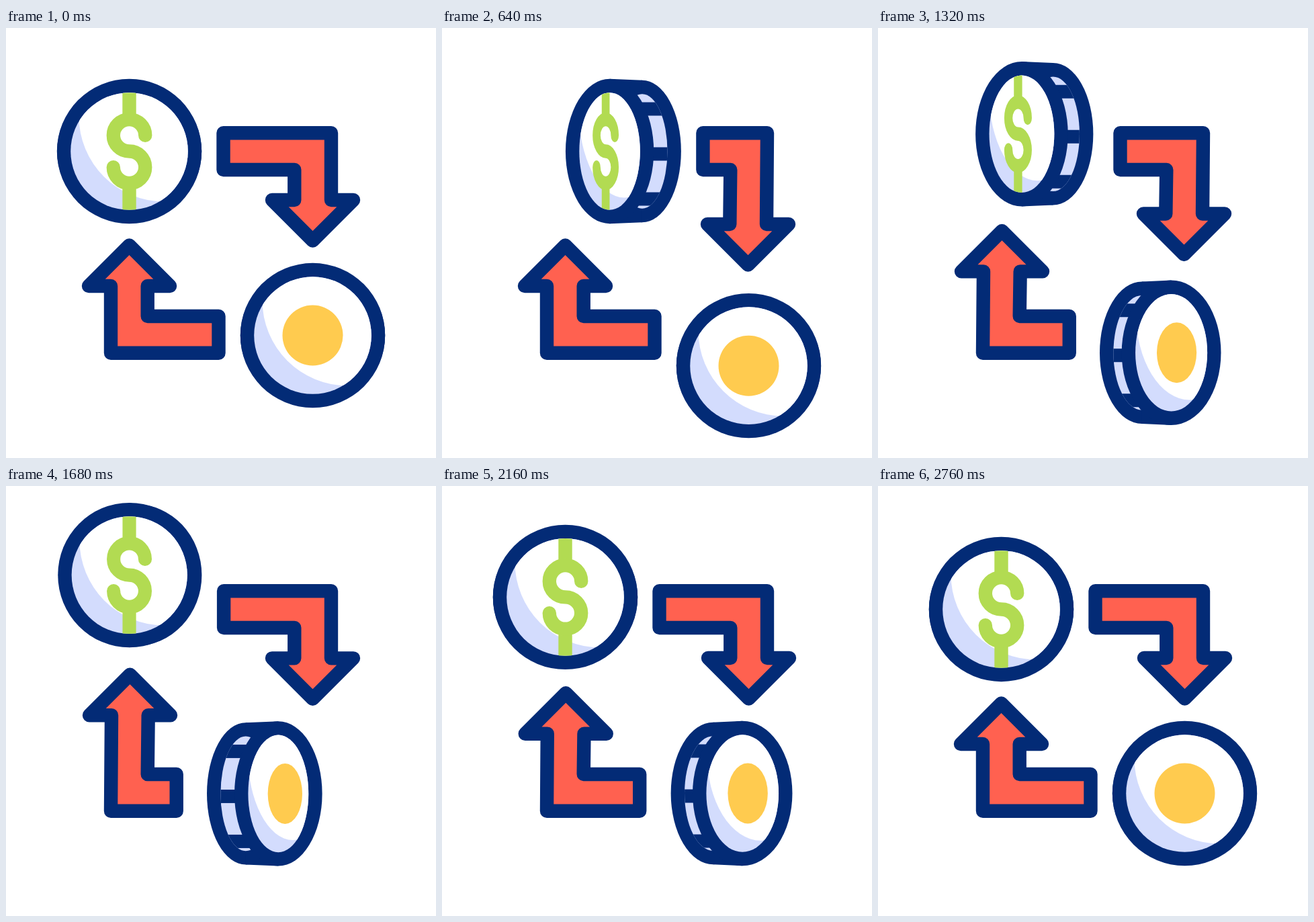
Recreate the animation shown at these times as an HTML page with a canvas. Size 640 by 640 pixels, loop 3 s.

```html
<!DOCTYPE html>
<html lang="en">
<head>
<meta charset="utf-8">
<title>Currency exchange</title>
<style>
  html, body { margin: 0; width: 100%; height: 100%; overflow: hidden; background: #fff; }
  canvas { display: block; width: 640px; height: 640px; }
</style>
</head>
<body>
<canvas></canvas>
<script>
const LOOP = 3000;
const NAVY = '#032b76', PALE = '#d3dcfd', RED = '#ff6150', GREEN = '#b2db52', GOLD = '#ffcb4f';
const LINE = 20.4, INNER = 87.3, OUTER = INNER + LINE;
const TAU = Math.PI * 2;

const canvas = document.querySelector('canvas');
const c = canvas.getContext('2d');
const ratio = window.devicePixelRatio || 1;
canvas.width = canvas.height = 640 * ratio;

// Soft step from 0 to 1, halfway at mid
const step = (t, mid, width = 75) => 1 / (1 + Math.exp((mid - t) / width));

// Amount of turn: it leads the travel on the way out and lags on the way back
const turn = (p, back) => 1 - Math.pow(1 - p, back ? 3.6 : 2.3);

function oval(x, rx, ry, color) {
  c.beginPath();
  c.ellipse(x, 0, rx, ry, 0, 0, TAU);
  if (color) {
    c.fillStyle = color;
    c.fill();
  }
}

// Edge of the coin; x runs from the face towards the rear
function rim(half, m) {
  const depth = 41 * m, rx = half + LINE;
  const lag = 25 * (1 - .7 * m) * Math.min(1, 10 * m);
  const rear = depth + lag, rearX = rx - lag, rearY = OUTER - 2;

  oval(rear, rearX, rearY, NAVY);
  c.beginPath();
  c.moveTo(0, -OUTER);
  c.lineTo(rear, -rearY);
  c.lineTo(rear, rearY);
  c.lineTo(0, OUTER);
  c.fill();

  c.save();
  oval(rear, rearX - LINE, rearY - LINE, PALE);
  c.clip();
  c.fillStyle = NAVY;
  for (let i = -1; i <= 1; i++) c.fillRect(0, 67 * i - 6, 2 * OUTER, 20);
  c.restore();
  oval(0, rx, OUTER, NAVY);
}

function dollar() {
  c.fillStyle = c.strokeStyle = GREEN;
  c.fillRect(-10.2, -92, 20.4, 48);
  c.fillRect(-10.2, 47, 20.4, 45);
  c.lineWidth = LINE;
  c.lineCap = 'round';
  c.beginPath();
  c.arc(0, -23.7, 23.7, 0, Math.PI / 2, true);
  c.arc(0, 23.7, 23.7, -Math.PI / 2, Math.PI);
  c.stroke();
}

function token() {
  oval(0, 45, 45, GOLD);
}

// shift: how far the emblem slides on a fully turned face
function coin(x, y, m, side, shift, emblem) {
  const half = INNER - 42.4 * m;
  c.save();
  c.translate(x - side * 20.5 * m, y);

  c.save();
  c.scale(side, 1);
  rim(half, m);
  c.restore();

  oval(0, half, INNER, PALE);
  c.clip();
  c.save();
  c.scale(half / INNER, 1);
  c.beginPath();
  c.arc(52 - 10 * m, -52 - 10 * m, 127 + 4 * m, 0, TAU);
  c.fillStyle = '#fff';
  c.fill();
  c.restore();

  c.translate(shift * m, 0);
  c.scale(1 - .43 * m, 1);
  emblem();
  c.restore();
}

function arrow(cut, drop, flip) {
  const left = 323.5 + cut, y = 256 + drop, x = 456.5 - Math.min(1, drop / 20);
  const points = [[left, 156.3], [484, 156.3], [x + 27.5, y], [x + 60.5, y], [x, y + 60.5],
    [x - 60.5, y], [x - 27.2, y], [429.3, 211], [left, 211]];
  c.save();
  if (flip) {
    c.translate(640, 640);
    c.scale(-1, -1);
  }
  c.beginPath();
  for (const p of points) c.lineTo(...p);
  c.closePath();
  c.fillStyle = RED;
  c.fill();
  c.strokeStyle = NAVY;
  c.lineWidth = LINE;
  c.lineJoin = 'round';
  c.stroke();
  c.restore();
}

function draw(t) {
  const start = step(t, 523, 60), middle = step(t, 1321), end = step(t, 2115);
  const a = start - middle, b = middle - end;
  c.setTransform(ratio, 0, 0, ratio, 0, 0);
  c.fillStyle = '#fff';
  c.fillRect(0, 0, 640, 640);
  arrow(74 * a, 41 * a, false);
  arrow(63.5 * b, 43.3 * b, true);
  coin(183.5 + 98.5 * a, 183.5 - 51.5 * b, turn(a, t > 1000), 1, -6, dollar);
  coin(456.5 - 72.5 * b, 457.5 + 51.5 * a, turn(b, t > 1720), -1, 10, token);
}

const begin = performance.now();
function tick() {
  draw((performance.now() - begin) % LOOP);
  requestAnimationFrame(tick);
}
tick();
</script>
</body>
</html>
```
